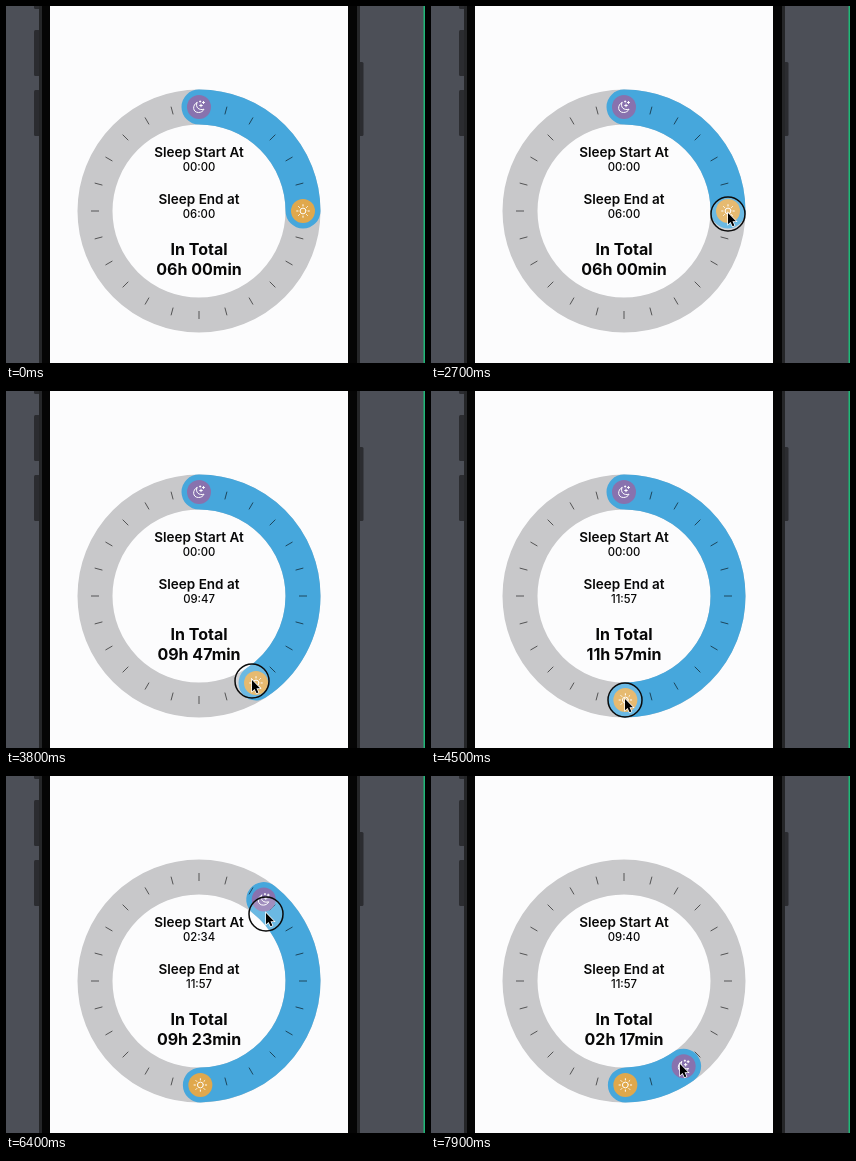
These frames come from a looping animation (419 by 357 pixels, 8 s). An HTML page with a canvas:

```html
<!DOCTYPE html>
<html lang="en">
<head>
<meta charset="utf-8">
<title>Sleep dial</title>
<style>
  html, body { margin: 0; width: 100%; height: 100%; overflow: hidden; background: #4c4f57; }
  canvas { display: block; width: 419px; height: 357px; }
</style>
</head>
<body>
<canvas id="stage"></canvas>
<script>
const W = 419, H = 357, LOOP = 8000, STEP = 100;
const CX = 193, CY = 205, R = 104, BAND = 35;
const BLUE = '#46a7dc';

const canvas = document.getElementById('stage');
const ctx = canvas.getContext('2d');
const dpr = window.devicePixelRatio || 1;
canvas.width = W * dpr;
canvas.height = H * dpr;

// Keys are [time, value, ...]; handle values are minutes on a 24 h dial.
const startKeys = [[5950, 0], [6400, 154], [6750, 360], [7100, 543], [7200, 554], [7600, 580]];
const endKeys = [[2800, 360], [3250, 440], [3600, 520], [3800, 587], [4300, 717]];
const cursorKeys = [
  [1800, 353, 364], [2600, 297, 207], [2800, 297, 207], [3250, 300, 245],
  [3600, 281, 280], [3800, 246, 289], [4300, 194, 308], [4600, 194, 308],
  [5300, 211, 47], [5450, 213, 22], [5850, 193, 101], [5950, 193, 101],
  [6400, 260, 137], [6750, 297, 202], [7100, 253, 268], [7200, 254, 272], [7600, 249, 288]
];
const presses = [[2600, 4600], [5850, 7700]];

// Monotone cubic interpolation: smooth, without overshooting any key.
function sample(keys, t, k = 1) {
  const last = keys.length - 1;
  if (t <= keys[0][0]) return keys[0][k];
  if (t >= keys[last][0]) return keys[last][k];
  const i = keys.findIndex(key => key[0] > t) - 1;
  const rate = j => (keys[j + 1][k] - keys[j][k]) / (keys[j + 1][0] - keys[j][0]);
  const slope = j => {
    if (j === 0 || j === last) return 0;
    const a = rate(j - 1), b = rate(j);
    return a * b <= 0 ? 0 : 2 * a * b / (a + b);
  };
  const span = keys[i + 1][0] - keys[i][0], u = (t - keys[i][0]) / span;
  const v = 1 - u;
  return keys[i][k] * (1 + 2 * u) * v * v + slope(i) * span * u * v * v
    + keys[i + 1][k] * u * u * (3 - 2 * u) - slope(i + 1) * span * u * u * v;
}

const angleOf = minutes => minutes / 1440 * Math.PI * 2 - Math.PI / 2;
const pad = n => String(n).padStart(2, '0');
const hours = m => pad(Math.floor(m / 60));
const clock = m => `${hours(m)}:${pad(m % 60)}`;

function box(color, x, y, w, h, r = 0) {
  ctx.fillStyle = color;
  ctx.beginPath();
  ctx.roundRect(x, y, w, h, r);
  ctx.fill();
}

function disc(color, x, y, r) {
  ctx.fillStyle = color;
  ctx.beginPath();
  ctx.arc(x, y, r, 0, Math.PI * 2);
  ctx.fill();
}

function line(x1, y1, x2, y2) {
  ctx.beginPath();
  ctx.moveTo(x1, y1);
  ctx.lineTo(x2, y2);
  ctx.stroke();
}

function label(text, y, size, weight) {
  ctx.font = `${weight} ${size}px Inter, sans-serif`;
  ctx.fillText(text, CX, y);
}

function drawPhone() {
  box('#4c4f57', 0, 0, W, H);
  box('#1fb877', 417.5, 0, 2, H);
  for (const [y, h] of [[-10, 13], [24, 46], [84, 46]]) box('#2b2c30', 28, y, 6, h, 1.5);
  box('#2b2c30', 352, 56, 5.5, 74, 1.5);
  box('#252628', 33, 0, 321, H);
  box('#050505', 36, 0, 315, H);
  box('#fcfcfd', 44, 0, 298, H);
}

function drawDial(start, end) {
  ctx.lineWidth = BAND;
  ctx.lineCap = 'butt';
  ctx.strokeStyle = '#c8c8ca';
  ctx.beginPath();
  ctx.arc(CX, CY, R, 0, Math.PI * 2);
  ctx.stroke();

  ctx.lineCap = 'round';
  ctx.strokeStyle = BLUE;
  ctx.beginPath();
  ctx.arc(CX, CY, R, angleOf(start), angleOf(end));
  ctx.stroke();

  ctx.lineCap = 'butt';
  ctx.lineWidth = 1;
  ctx.strokeStyle = 'rgba(0, 0, 0, .58)';
  for (let i = 0; i < 24; i++) {
    const c = Math.cos(i * Math.PI / 12), s = Math.sin(i * Math.PI / 12);
    line(CX + c * 100, CY + s * 100, CX + c * 108, CY + s * 108);
  }
}

function drawHandle(minutes, color, icon) {
  const a = angleOf(minutes);
  ctx.save();
  ctx.translate(CX + R * Math.cos(a), CY + R * Math.sin(a));
  disc(color, 0, 0, 12);
  ctx.strokeStyle = '#fff';
  ctx.lineWidth = 1;
  ctx.lineCap = 'round';
  icon();
  ctx.restore();
}

function moon() {
  ctx.beginPath();
  ctx.moveTo(-2, -4.5);
  ctx.bezierCurveTo(-7, -2, -6.5, 5.5, -.5, 5.5);
  ctx.bezierCurveTo(2, 5.5, 4, 4.3, 5, 2.2);
  ctx.bezierCurveTo(0, 3.6, -4, .5, -2, -4.5);
  ctx.stroke();
  for (const [x, y, r] of [[2, -1.5, 1.3], [4.5, -4.5, 1], [1.2, -5.5, .6]]) {
    line(x - r, y, x + r, y);
    line(x, y - r, x, y + r);
  }
}

function sun() {
  ctx.beginPath();
  ctx.arc(0, 0, 2.9, 0, Math.PI * 2);
  ctx.stroke();
  for (let i = 0; i < 8; i++) {
    const c = Math.cos(i * Math.PI / 4), s = Math.sin(i * Math.PI / 4);
    line(c * 5, s * 5, c * 6.3, s * 6.3);
  }
}

function drawTexts(start, end) {
  const total = end - start;
  ctx.fillStyle = '#080808';
  ctx.textAlign = 'center';
  label('Sleep Start At', 150.7, 13.5, 600);
  label(clock(start), 165, 11.3, 500);
  label('Sleep End at', 197.8, 13.5, 600);
  label(clock(end), 212.3, 11.3, 500);
  label('In Total', 248.7, 16, 700);
  label(`${hours(total)}h ${pad(total % 60)}min`, 268.7, 16, 700);
}

function drawCursor(x, y, pressed) {
  ctx.save();
  ctx.translate(x, y);
  if (pressed) {
    disc('rgba(255, 255, 255, .2)', 0, 1, 17);
    ctx.strokeStyle = '#0b0b0b';
    ctx.lineWidth = 1.5;
    ctx.beginPath();
    ctx.arc(0, 1, 17, 0, Math.PI * 2);
    ctx.stroke();
  }
  const arrow = new Path2D('M0 0V11.2L2.6 8.9L4.6 13.3L6.4 12.5L4.5 8.2H8Z');
  ctx.lineWidth = 1.4;
  ctx.strokeStyle = '#fff';
  ctx.stroke(arrow);
  ctx.fillStyle = '#000';
  ctx.fill(arrow);
  ctx.restore();
}

function render(t) {
  const start = Math.round(sample(startKeys, t));
  const end = Math.round(sample(endKeys, t));
  ctx.setTransform(dpr, 0, 0, dpr, 0, 0);
  drawPhone();
  drawDial(start, end);
  drawHandle(start, '#8872ae', moon);
  drawHandle(end, '#e0a84c', sun);
  drawTexts(start, end);
  if (t >= 1900) {
    const pressed = presses.some(([from, to]) => t >= from && t < to);
    drawCursor(sample(cursorKeys, t, 1), sample(cursorKeys, t, 2), pressed);
  }
}

function tick() {
  const t = performance.now() % LOOP;
  render(Math.floor(t / STEP) * STEP);
  requestAnimationFrame(tick);
}
tick();
</script>
</body>
</html>
```
